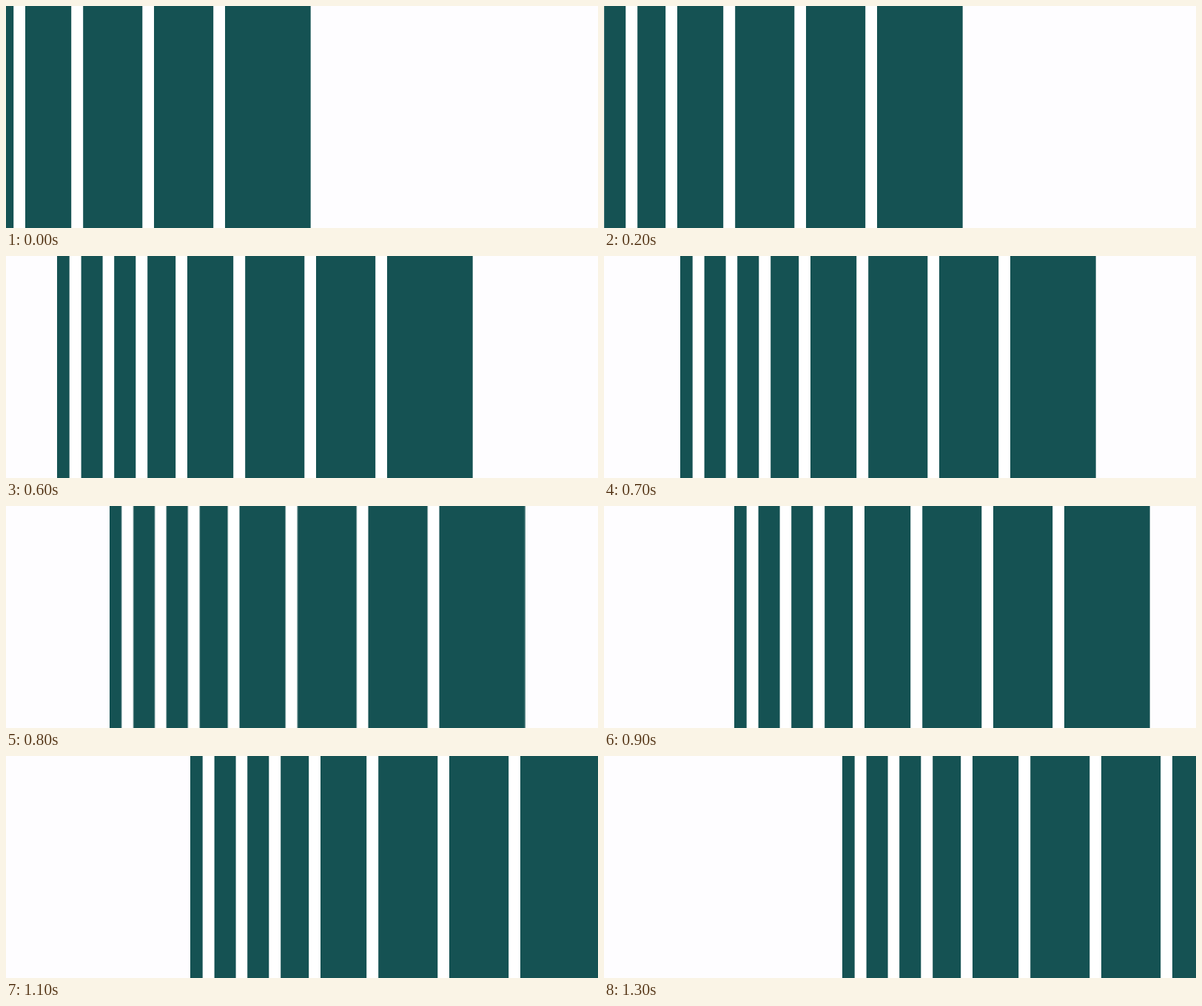
Write an HTML page that moves like this. It is 800 px wide and 301 px high and loops after 1.4 s.

```html
<!DOCTYPE html>
<html lang="en">
<head>
<meta charset="utf-8">
<title>Sliding bars</title>
<style>
  html, body { margin: 0; width: 100%; height: 100%; overflow: hidden; background: #fefdff; }
  svg { display: block; width: 800px; height: 301px; }
  .bars { fill: #155253; animation: slide 1400ms infinite; }
  .gap { fill: #fff; }

  /* 36.5px every 100ms, with a slightly shorter step halfway */
  @keyframes slide {
    0%     { transform: translateX(-150px);  animation-timing-function: steps(7, end); }
    49.99% { transform: translateX(105.5px); animation-timing-function: step-end; }
    50%    { transform: translateX(103px);   animation-timing-function: steps(7, end); }
    100%   { transform: translateX(358.5px); }
  }
</style>
</head>
<body>
<svg viewBox="0 0 800 301">
  <g class="bars">
    <rect class="gap" width="561.7" height="301"/>
    <rect x="0" width="16.7" height="301"/>
    <rect x="32.6" width="29" height="301"/>
    <rect x="77.2" width="29.1" height="301"/>
    <rect x="122.2" width="38" height="301"/>
    <rect x="176" width="62.2" height="301"/>
    <rect x="254.2" width="80.1" height="301"/>
    <rect x="350" width="80.2" height="301"/>
    <rect x="446" width="115.7" height="301"/>
  </g>
</svg>
</body>
</html>
```
